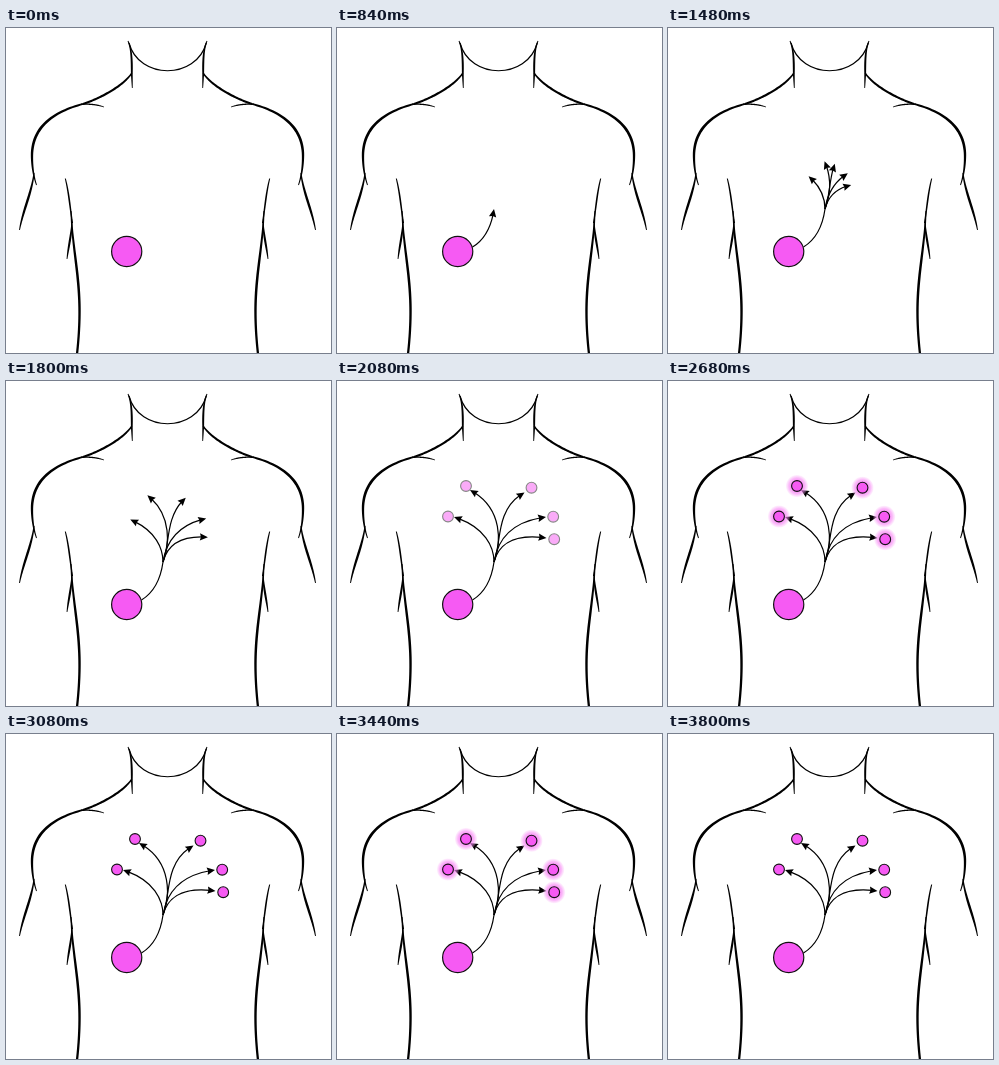
Recreate the animation shown at these times as an HTML page. Size 325 px wide and 325 px high, loop 3.84 s.

```html
<!DOCTYPE html>
<html lang="en">
<head>
<meta charset="utf-8">
<title>Spread in the chest</title>
<style>
html, body { margin: 0; width: 100%; height: 100%; overflow: hidden; background: #fff; }
svg { display: block; width: 100vw; height: 100vh; }
</style>
</head>
<body>
<svg id="stage" viewBox="0 0 325 325">
  <defs>
    <radialGradient id="glow">
      <stop offset="0.45" stop-color="#f66cf3" stop-opacity="0.8"/>
      <stop offset="0.75" stop-color="#f88cf5" stop-opacity="0.6"/>
      <stop offset="1" stop-color="#fbb5f9" stop-opacity="0.2"/>
    </radialGradient>
  </defs>
  <g id="body"></g>
  <g id="arrows"></g>
  <g id="halos"></g>
  <g id="dots"></g>
  <circle cx="120.7" cy="223.5" r="15.1" fill="#f65af3" stroke="#111" stroke-width="1.2"/>
</svg>
<script>
const LOOP = 3840, STEP = 40;
const BEGIN = 80, SPLIT = 840, ARRIVE = 1930;
const STEM = 'M135.5 219C147 212 154.5 199 157 181';
const BRANCHES = [
  'C157 164 146 145 117 136',
  'C165 160 165 126 133 109',
  'C165 160 158 128 187.5 111.5',
  'C161 156 177 140 209 136',
  'C161 165 175 152 209.5 157'
];
const DOTS = [[111, 135.5], [129, 105], [194.5, 106.7], [216.2, 135.7], [217.2, 158.2]];

const $ = id => document.getElementById(id);
const clamp = v => Math.max(0, Math.min(1, v));
const ramp = (t, a, b) => clamp((t - a) / (b - a));

function add(parent, tag, attrs) {
  const el = document.createElementNS('http://www.w3.org/2000/svg', tag);
  for (const k in attrs) el.setAttribute(k, attrs[k]);
  return parent.appendChild(el);
}

const addLine = (parent, d) =>
  add(parent, 'path', { d, fill: 'none', stroke: '#000', 'stroke-width': 1.2 });

// Ink line whose width goes from a, through m in the middle, to b
function ink(parent, d, a, m, b) {
  const path = add(parent, 'path', { d });
  const len = path.getTotalLength(), n = 40, left = [], right = [];
  for (let i = 0; i <= n; i++) {
    const u = i / n, s = u * len;
    const p = path.getPointAtLength(s);
    const q0 = path.getPointAtLength(Math.max(0, s - 0.5));
    const q1 = path.getPointAtLength(Math.min(len, s + 0.5));
    const ang = Math.atan2(q1.y - q0.y, q1.x - q0.x);
    const bump = Math.sin(Math.PI * u);
    const w = ((a + (b - a) * u) * (1 - bump) + m * bump) / 2;
    const dx = -Math.sin(ang) * w, dy = Math.cos(ang) * w;
    left.push([p.x + dx, p.y + dy]);
    right.unshift([p.x - dx, p.y - dy]);
  }
  const pts = left.concat(right).map(p => p.map(v => v.toFixed(2)).join(' '));
  path.setAttribute('d', 'M' + pts.join('L') + 'Z');
}

function drawBody() {
  const body = $('body');
  for (const flip of [false, true]) {
    const side = add(body, 'g', flip ? { transform: 'translate(323 0) scale(-1 1)' } : {});
    ink(side, 'M122 13C125 20 126 28 125.8 46L126.3 60', 1, 2, 0.8);
    ink(side, 'M125.8 45C119 56 98 69 77 76', 1.4, 2.2, 2);
    ink(side, 'M77 76C50 83 27 97 26 126C25.8 138 27.5 148 30.5 157', 1.8, 2.7, 0.9);
    ink(side, 'M75 76.3Q88 75.5 98 79', 1.5, 1.3, 0.6);
    ink(side, 'M28 145C26 164 17 182 13.5 202', 1, 2.4, 0.9);
    ink(side, 'M59.3 150.5C63 165 64 180 66.5 195', 1, 1.6, 1.1);
    ink(side, 'M65 183C66.5 218 72 240 73.3 272C74 290 73 308 71 326', 1, 2.5, 2.3);
    ink(side, 'M66 194C65.5 207 62.5 218 61 231', 1, 2.1, 0.8);
  }
  addLine(body, 'M123 15C133 52 190 52 200.3 15');
}

drawBody();

const stem = addLine($('arrows'), STEM);
const stemLen = stem.getTotalLength();
const arrows = BRANCHES.map(branch => {
  const line = addLine($('arrows'), STEM + branch);
  const head = add($('arrows'), 'path', { d: 'M0 0L-8 -3.7L-7 0L-8 3.7Z' });
  return { line, head, total: line.getTotalLength() };
});

const halos = DOTS.map(([cx, cy]) =>
  add($('halos'), 'circle', { cx, cy, r: 11, fill: 'url(#glow)' }));
DOTS.forEach(([cx, cy]) => add($('dots'), 'circle', {
  cx, cy, r: 5.4, fill: '#f65af3', stroke: '#111', 'stroke-width': 1.1
}));

// The stem is drawn once; each branch shows only its part past the stem
function drawArrow({ line, head, total }, i, t) {
  const len = stemLen * ramp(t, BEGIN, SPLIT) + (total - stemLen) * ramp(t, SPLIT, ARRIVE);
  const part = Math.max(0, len - 5 - stemLen);
  line.setAttribute('visibility', part > 0 ? 'visible' : 'hidden');
  line.setAttribute('stroke-dasharray', `0 ${stemLen} ${part} 999`);
  head.setAttribute('visibility', t > (i ? SPLIT : BEGIN) ? 'visible' : 'hidden');
  const tip = line.getPointAtLength(len);
  const back = line.getPointAtLength(Math.max(0, len - 7));
  const ang = len > 1 ? Math.atan2(tip.y - back.y, tip.x - back.x) * 180 / Math.PI : -35;
  head.setAttribute('transform', `translate(${tip.x} ${tip.y}) rotate(${ang})`);
  return len;
}

function render(t) {
  const lens = arrows.map((a, i) => drawArrow(a, i, t));
  const drawn = Math.max(0, lens[0] - 5);
  stem.setAttribute('visibility', drawn > 0 ? 'visible' : 'hidden');
  stem.setAttribute('stroke-dasharray', `${drawn} 999`);
  $('dots').setAttribute('opacity', ramp(t, 1880, 2280));
  const pulse = t < 2360 ? 0 : Math.sin(Math.PI * (t - 2360) / 720) ** 2;
  halos.forEach(h => h.setAttribute('opacity', pulse));
}

const start = performance.now();
function tick() {
  const t = (performance.now() - start) % LOOP;
  render(Math.floor(t / STEP) * STEP);
  requestAnimationFrame(tick);
}
tick();
</script>
</body>
</html>
```
